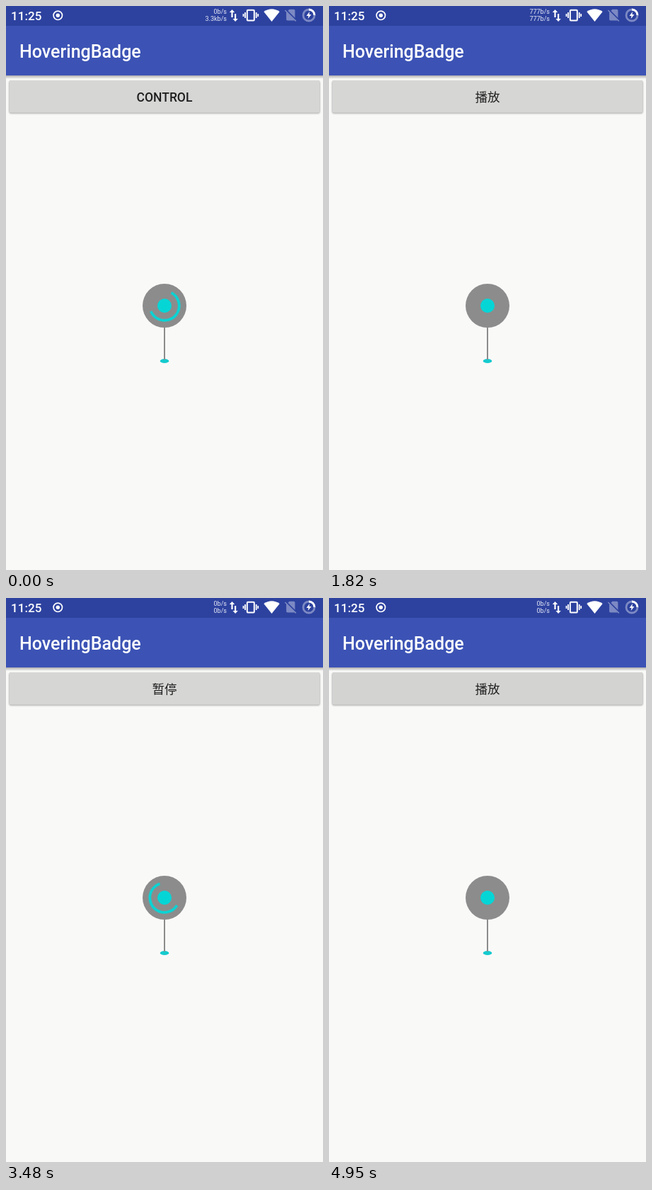
An HTML page without scripts that plays this animation: 448x796 px, repeating every 5.64 s.

```html
<!DOCTYPE html>
<html lang="en">
<head>
<meta charset="utf-8">
<title>Loading pin</title>
<style>
  html, body { margin: 0; width: 100%; height: 100%; overflow: hidden; background: #f9f9f8; }
  svg { display: block; }
  text { font-family: Roboto, "Noto Sans CJK SC", "Noto Sans CJK", sans-serif; }

  .clock { font-size: 17.1px; font-weight: 500; fill: #fff; }
  .title { font-size: 25px; font-weight: 500; fill: #fff; }
  .rates text { font-size: 9px; fill: #e6e9f6; text-anchor: end; }
  .labels text { font-size: 17.5px; font-weight: 500; fill: #1f1f1f; text-anchor: middle; }

  .button { fill: #d6d7d5; filter: drop-shadow(0 0 .7px rgba(0, 0, 0, .2)) drop-shadow(0 1px 1.2px rgba(0, 0, 0, .3)); }
  .line { fill: none; stroke: #fff; }
  .solid { fill: #fff; }
  .dim { opacity: .38; }

  /* every part shares the same loop; click times are 140, 2310 and 4400 ms */
  .button, .rates, .labels, .ripple, .pin, .ring, .spinner { animation: 5640ms infinite; }
  .button, .rates, .labels, .ring { animation-timing-function: step-end; }
  .button { animation-name: press; }
  .rates { animation-name: rates; }
  .labels { animation-name: labels; }
  .ripple { animation-name: ripple; transform-origin: 384px 131px; }
  .pin { animation-name: jump; }
  .ring { animation-name: ring; }
  .spinner { animation-name: spin; transform-origin: 224px 423px; animation-timing-function: cubic-bezier(.364, 0, .636, 1); }

  @keyframes press {
    0%, 50.709% { fill: #d6d7d5; }
    40.957%, 78.014%, 100% { fill: #d3d4d2; }
  }
  @keyframes rates {
    0% { transform: none; }
    14.539% { transform: translateY(-40px); }
    32.27% { transform: translateY(-80px); }
    50.709% { transform: translateY(-120px); }
    68.44% { transform: translateY(-160px); }
    86.348%, 100% { transform: translateY(-120px); }
  }
  @keyframes labels {
    0% { transform: none; }
    2.482% { transform: translateY(-60px); }
    40.957% { transform: translateY(-120px); }
    78.014%, 100% { transform: translateY(-60px); }
  }
  @keyframes ripple {
    0%, 2.482%, 40.957%, 78.014% { transform: scale(.4); opacity: 0; }
    3.901%, 42.376%, 79.433% { transform: none; opacity: .045; }
    6.738%, 45.213%, 82.27%, 100% { transform: scale(2.2); opacity: 0; }
  }
  @keyframes jump {
    0%, 2.482%, 78.014% { transform: none; animation-timing-function: cubic-bezier(.39, .575, .565, 1); }
    4.787%, 80.319% { transform: translateY(-22.9px); animation-timing-function: cubic-bezier(.47, 0, .745, .715); }
    7.447%, 82.979%, 100% { transform: none; }
  }
  @keyframes ring {
    0%, 40.957% { opacity: 1; }
    2.482%, 78.014%, 100% { opacity: 0; }
  }
  @keyframes spin {
    0% { transform: rotate(297deg); animation-timing-function: ease-out; }
    2.482% { transform: rotate(344deg); animation-timing-function: step-end; }
    40.603% { transform: rotate(0deg); }
    58.333% { transform: rotate(360deg); }
    76.064% { transform: rotate(720deg); }
    93.794%, 100% { transform: rotate(1080deg); }
  }
  /* the lift reaches 19px 80 ms after the click */
  .pin { animation-delay: 4ms; }
</style>
</head>
<body>
<svg width="448" height="796" viewBox="0 0 448 796">
  <defs>
    <linearGradient id="shade" x2="0" y2="1">
      <stop stop-color="#000" stop-opacity=".3"/>
      <stop offset="1" stop-color="#000" stop-opacity="0"/>
    </linearGradient>
    <clipPath id="buttonArea"><rect x="4.600" y="105" width="438.800" height="45.800" rx="2.500"/></clipPath>
    <clipPath id="statusArea"><rect width="448" height="28"/></clipPath>
  </defs>

  <rect width="448" height="796" fill="#f9f9f8"/>
  <rect y="98" width="448" height="5" fill="url(#shade)"/>
  <rect y="28" width="448" height="70" fill="#3c53b5"/>
  <rect width="448" height="28" fill="#2d429f"/>
  <text class="title" x="19" y="73">HoveringBadge</text>

  <!-- status bar -->
  <text class="clock" x="7" y="20">11:25</text>
  <circle class="line" cx="73.300" cy="13.300" r="6.200" stroke-width="1.700"/>
  <circle class="solid" cx="73.300" cy="13.300" r="2.700"/>

  <g clip-path="url(#statusArea)">
    <g class="rates">
      <text x="312" y="11">0b/s</text><text x="312" y="21">3.3kb/s</text>
      <text x="312" y="51">0b/s</text><text x="312" y="61">1.1kb/s</text>
      <text x="312" y="91">777b/s</text><text x="312" y="101">777b/s</text>
      <text x="312" y="131">0b/s</text><text x="312" y="141">0b/s</text>
      <text x="312" y="171">413b/s</text><text x="312" y="181">1.3kb/s</text>
    </g>
  </g>

  <path class="solid" d="M318.400 16V9h-2.600l3.700-4 3.700 4h-2.600v7zM323 11v7h-2.600l3.700 4 3.700-4h-2.600v-7z"/>
  <rect class="line" x="340.800" y="5.800" width="10" height="14.600" rx="1" stroke-width="2"/>
  <path class="line" d="M338 9v8M335.500 11v4M353.700 9v8M356.200 11v4" stroke-width="1.800"/>
  <path class="solid" d="M364.300 8Q375.500 .5 386.700 8L375.500 22z"/>
  <g class="dim" transform="translate(391.700 2) scale(.88)">
    <path class="solid" d="M19 5a2 2 0 0 0-2-2h-7L7.700 5.300 19 16.700zM3.600 3.900L2.400 5.200 5 7.800V19a2 2 0 0 0 2 2h10q.5 0 1-.3l1.900 1.900 1.200-1.200z"/>
  </g>
  <circle class="line dim" cx="428" cy="13" r="8" stroke-width="2.800"/>
  <path class="line" d="M428 5A8 8 0 0 1 436 13" stroke-width="2.800"/>
  <path class="solid" d="M429 8l-4.500 6h3l-.8 4 4.800-6h-3z"/>

  <!-- button -->
  <rect class="button" x="4.600" y="105" width="438.800" height="45.800" rx="2.500"/>
  <g clip-path="url(#buttonArea)">
    <circle class="ripple" cx="384" cy="131" r="34"/>
    <g class="labels">
      <text x="224" y="135">CONTROL</text>
      <text x="224" y="194.500">播放</text>
      <text x="224" y="254.500">暂停</text>
    </g>
  </g>

  <!-- pin -->
  <g class="pin">
    <ellipse cx="224" cy="501" rx="6.300" ry="3" fill="#16cbce"/>
    <path d="M224 453v46" stroke="#8c8c8c" stroke-width="2"/>
    <circle cx="224" cy="423" r="31" fill="#8c8c8c"/>
    <circle cx="224" cy="423" r="10" fill="#06d5d6"/>
    <g class="ring">
      <circle class="spinner" cx="224" cy="423" r="20.700" fill="none" stroke="#06d5d6" stroke-width="3.600" pathLength="360" stroke-dasharray="220 140"/>
    </g>
  </g>
</svg>
</body>
</html>
```
